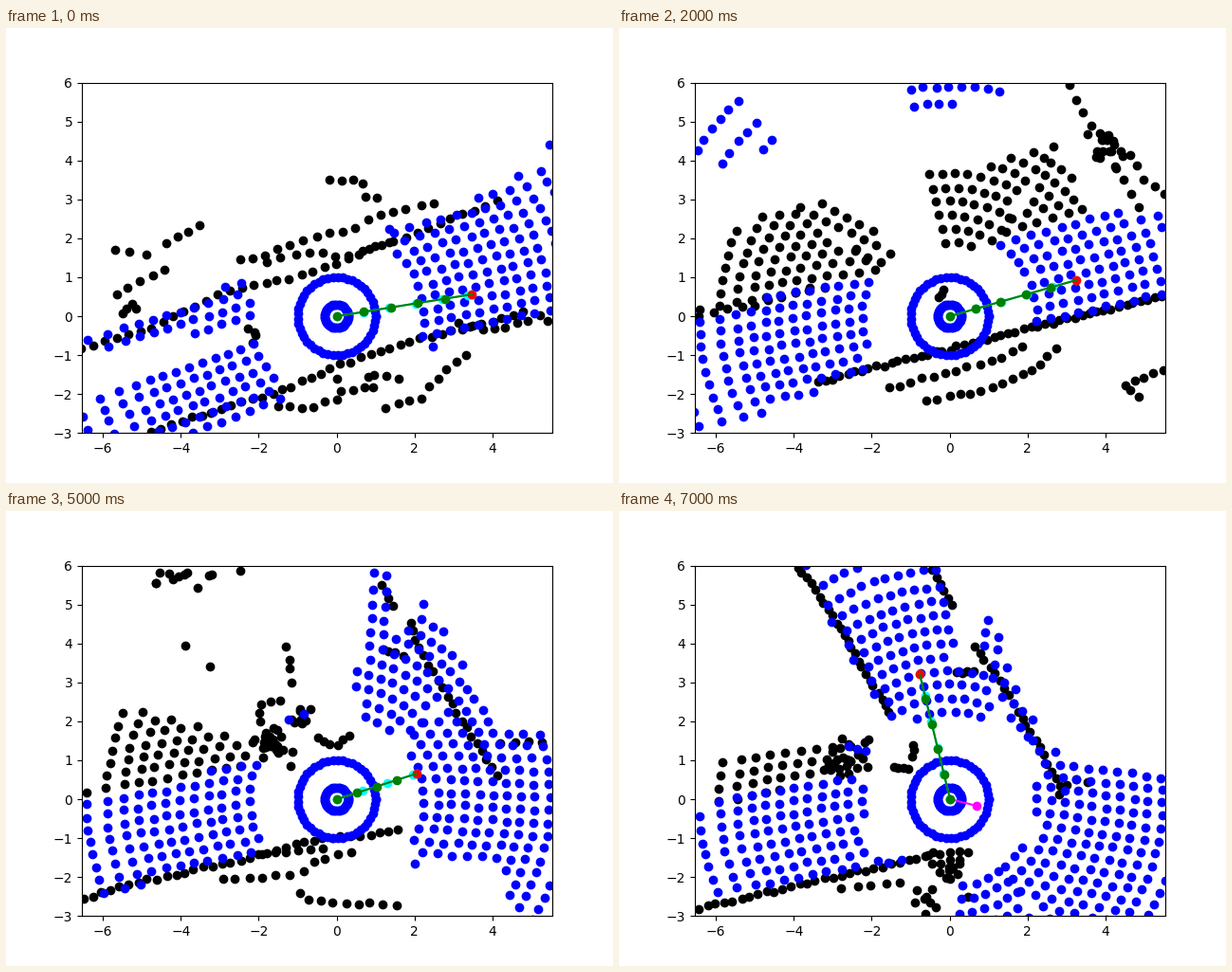
A matplotlib script for the animation above (8000 ms loop, 640 by 480 pixels).

```python
import numpy as np
import matplotlib.pyplot as plt
from matplotlib.animation import FuncAnimation
from matplotlib.path import Path

SCALE = 41.07                       # pixels per metre
ORIGIN = np.array([348.5, 304.0])   # robot position in stage pixels
PITCH = 13.5                        # dot spacing along a scan ring


def pairs(xy):
    return np.array(xy, float).reshape(-1, 2)


def to_data(points):
    p = (pairs(points) - ORIGIN) / SCALE
    return p[:, 0], -p[:, 1]


def ring_radii(first, last=370):
    """Scan rings: even near the robot, spreading with r squared further out."""
    r = first
    while r < last:
        yield r
        r += max(14.6, 0.00036 * r * r)


def ring_dots(first, axis):
    """Evenly spaced dots on every ring, counted from four perpendicular axes."""
    for r in ring_radii(first):
        n = int(r * np.pi / 4 / PITCH)
        turn = np.arange(-n, n + 1) * PITCH / r
        for quarter in range(4):
            a = np.radians(axis + 90 * quarter) + turn
            yield ORIGIN + r * np.c_[np.cos(a), -np.sin(a)]


class Cloud:
    """Scan dots: rings cut to regions, walls and clutter, in stage pixels."""

    def __init__(self, seed, first, offset=(0, 0)):
        self.rng = np.random.default_rng(seed)
        self.first = first
        self.offset = offset
        self.parts = []

    def region(self, axis, *xy):
        dots = np.vstack(list(ring_dots(self.first, axis)))
        inside = Path(pairs(xy) + self.offset).contains_points(dots)
        dots = dots[inside]
        self.parts.append(dots + self.rng.uniform(-1, 1, dots.shape))

    def wall(self, gap, *xy):
        p = pairs(xy) + self.offset
        s = np.r_[0, np.cumsum(np.hypot(*np.diff(p, axis=0).T))]
        at = np.linspace(0, s[-1], round(s[-1] / gap) + 1)
        dots = np.c_[np.interp(at, s, p[:, 0]), np.interp(at, s, p[:, 1])]
        self.parts.append(dots + self.rng.uniform(-1.5, 1.5, dots.shape))

    def clutter(self, n, x, y, sx, sy):
        dots = self.rng.normal((x, y), (sx, sy), (n, 2))
        self.parts.append(dots + self.offset)

    def data(self):
        return to_data(np.vstack(self.parts))


def bend(dark, blue):
    dark.wall(11, 153, 425, 224, 403, 290, 382, 350, 356, 420, 332, 470, 320, 545, 300)
    dark.wall(13, 78, 337, 150, 319, 230, 278, 310, 262, 370, 240, 440, 212, 518, 183)
    dark.wall(14, 246, 244, 269, 241, 311, 223, 364, 212, 390, 198, 450, 185)
    dark.wall(14, 276, 246, 325, 235, 355, 242, 404, 226)
    dark.wall(12, 340, 160, 374, 161, 381, 179, 391, 178)
    dark.wall(14, 115, 234, 147, 239)
    dark.wall(13, 170, 226, 205, 209)
    dark.wall(15, 118, 282, 142, 265, 166, 254)
    dark.wall(8, 122, 302, 135, 290, 138, 297)
    dark.wall(6, 256, 318, 264, 322, 260, 331)
    dark.wall(12, 288, 399, 314, 401, 348, 393)
    dark.wall(13, 401, 400, 438, 390, 451, 373, 485, 345)
    dark.wall(13, 350, 369, 352, 382, 390, 380, 379, 364, 415, 370)
    dark.wall(13, 477, 311, 508, 320, 537, 313, 564, 302, 572, 310)
    blue.region(17, 75, 325, 105, 322, 258, 262, 264, 310, 205, 322, 75, 340)
    blue.region(19, 75, 385, 262, 328, 298, 390, 190, 430, 78, 432)
    blue.region(12, 403, 210, 470, 188, 530, 165, 582, 115, 582, 300, 510, 315, 436, 342)


def junction(dark, blue):
    blue.region(10, 76, 178, 130, 161, 200, 143, 283, 125, 340, 112, 378, 102,
                410, 92, 445, 85, 512, 65, 512, 50, 72, 50)
    blue.region(10, 72, 440, 72, 195, 108, 200, 122, 218, 122, 300, 150, 290,
                262, 274, 262, 372, 345, 395, 352, 432)
    blue.region(10, 418, 238, 575, 198, 580, 297, 432, 335)
    dark.region(10, 180, 238, 190, 205, 240, 185, 300, 172, 380, 155, 467, 130, 495, 128,
                523, 118, 568, 105, 580, 185, 500, 222, 420, 245, 350, 245, 335, 236,
                300, 258, 265, 280, 168, 292)
    dark.wall(15, 139, 233, 158, 215, 171, 222)
    dark.wall(9, 500, 243, 508, 258, 527, 253)
    dark.clutter(28, 388, 372, 8, 18)
    dark.wall(11, 395, 342, 450, 327, 490, 318, 573, 297)
    dark.wall(16, 398, 362, 453, 350)
    blue.wall(14, 365, 407, 376, 395, 398, 393)


def corridor(dark, blue):
    blue.region(13, 74, 135, 112, 145, 150, 136, 167, 114, 126, 70, 100, 90)
    blue.region(13, 305, 55, 412, 55, 412, 72, 360, 70, 360, 86, 308, 88)
    blue.region(10, 78, 307, 150, 285, 272, 258, 262, 362, 150, 408, 78, 430)
    blue.region(13, 395, 228, 440, 215, 568, 185, 577, 210, 577, 290, 435, 322)
    dark.region(10, 80, 306, 110, 208, 150, 196, 200, 182, 245, 188, 300, 250, 262, 264, 150, 290)
    dark.region(13, 326, 155, 365, 150, 455, 120, 500, 195, 440, 212, 335, 240)
    dark.wall(16, 474, 60, 498, 103, 510, 115, 522, 145, 548, 190)
    dark.clutter(18, 515, 125, 8, 10)
    dark.wall(13, 540, 133, 551, 157, 575, 175)
    dark.wall(8, 210, 374, 280, 355, 330, 343, 440, 315, 573, 283)
    dark.wall(12, 283, 380, 350, 362, 405, 348, 425, 335)
    dark.wall(12, 325, 394, 385, 382, 440, 360, 460, 338)
    dark.wall(14, 85, 303, 150, 290, 200, 275)
    dark.wall(11, 547, 389, 533, 377, 573, 362)
    dark.wall(5, 336, 284, 343, 276)


def crossing(dark, blue):
    blue.region(10, 72, 133, 105, 150, 142, 144, 182, 134, 222, 123, 240, 108, 205, 70,
                200, 55, 135, 55, 72, 125)
    blue.region(10, 80, 305, 122, 295, 275, 260, 275, 365, 128, 402, 85, 412)
    blue.region(6, 428, 215, 450, 180, 490, 130, 518, 92, 577, 215, 577, 348, 520, 342,
                500, 325, 437, 325)
    blue.clutter(6, 380, 204, 5, 10)
    blue.wall(8, 402, 237, 418, 240)
    dark.region(10, 85, 300, 110, 210, 190, 193, 275, 170, 312, 245, 165, 270)
    dark.wall(19, 227, 90, 240, 111, 259, 146)
    dark.wall(9, 252, 60, 263, 76)
    dark.wall(13, 312, 181, 339, 176, 362, 184)
    dark.wall(11, 290, 205, 320, 222, 345, 240)
    dark.clutter(30, 362, 212, 17, 10)
    dark.wall(14, 372, 238, 410, 237)
    dark.clutter(20, 103, 332, 11, 13)
    dark.wall(10, 88, 406, 170, 386, 280, 360, 340, 345, 458, 322)
    dark.wall(14, 226, 388, 281, 388, 279, 401, 348, 398, 355, 404, 391, 398, 424, 387)
    dark.wall(13, 285, 365, 320, 370, 360, 366, 425, 340)
    dark.wall(16, 427, 398, 460, 403)
    dark.wall(9, 491, 135, 505, 160, 530, 200, 545, 220, 570, 262)


def opening(dark, blue):
    dark.region(10, 80, 302, 110, 210, 150, 205, 200, 222, 265, 240, 262, 268, 160, 290)
    dark.clutter(12, 190, 68, 22, 6)
    dark.wall(29, 190, 142, 214, 165)
    dark.wall(13, 296, 143, 300, 180)
    dark.wall(11, 269, 222, 268, 203, 288, 201)
    dark.clutter(22, 280, 246, 11, 11)
    dark.clutter(10, 310, 218, 6, 6)
    dark.wall(8, 330, 238, 338, 247, 349, 247, 361, 236)
    dark.wall(10, 82, 409, 130, 394, 260, 365, 320, 348, 413, 337)
    dark.wall(14, 228, 389, 290, 385, 310, 382, 325, 370, 365, 360)
    dark.wall(13, 270, 362, 335, 356)
    dark.wall(13, 310, 402, 313, 410, 349, 412, 411, 416)
    dark.wall(7, 398, 145, 418, 152)
    dark.wall(7, 396, 79, 409, 99)
    dark.wall(10, 428, 117, 431, 138, 445, 160, 475, 212, 517, 278)
    dark.wall(15, 521, 245, 565, 244)
    blue.region(10, 80, 305, 265, 262, 268, 362, 120, 402, 80, 412)
    blue.region(-3, 366, 182, 378, 105, 385, 60, 415, 62, 405, 140, 428, 115, 440, 95,
                478, 152, 515, 220, 577, 240, 577, 432, 538, 432, 520, 375, 428, 372,
                423, 240, 375, 216)
    blue.wall(16, 297, 219, 313, 215)


def turn(dark, blue):
    dark.region(10, 85, 320, 95, 262, 128, 258, 265, 240, 262, 258, 210, 285)
    dark.wall(8, 187, 60, 200, 72, 240, 135, 260, 172, 285, 212)
    dark.wall(9, 375, 142, 400, 178, 440, 245, 465, 290)
    dark.wall(9, 330, 63, 341, 83, 350, 100)
    dark.wall(6, 356, 170, 374, 169)
    dark.wall(6, 310, 247, 310, 259)
    dark.wall(6, 289, 271, 305, 271)
    dark.clutter(20, 240, 264, 11, 8)
    dark.wall(9, 84, 419, 190, 394, 300, 370, 330, 361, 367, 360)
    dark.clutter(13, 345, 373, 12, 7)
    dark.wall(14, 235, 397, 296, 393)
    dark.clutter(10, 325, 410, 25, 12)
    dark.wall(12, 465, 298, 478, 283, 495, 287)
    blue.region(10, 80, 320, 100, 305, 258, 280, 262, 380, 128, 402, 80, 412)
    blue.region(13, 187, 55, 345, 55, 355, 160, 395, 165, 400, 218, 285, 220, 262, 190)
    blue.region(-8, 376, 106, 386, 104, 412, 155, 440, 230, 470, 260, 577, 272, 577, 432,
                352, 432, 360, 392, 405, 370, 440, 340, 436, 250, 400, 205, 380, 150)
    blue.wall(10, 241, 247, 260, 252)
    blue.wall(13, 272, 370, 297, 369)


HOME = 349, 304
TREE = (
    (80, 313, 88, 320, 107, 342, 132, 328, 153, 307),
    (132, 328, 153, 347, 172, 367),
    (153, 347, 148, 383, 172, 367, 200, 360, 212, 386, 239, 396, 268, 399,
     291, 383, 319, 376, 322, 347, 347, 333, *HOME),
    (268, 399, 268, 440), (319, 376, 336, 397), (291, 383, 265, 378),
    (239, 396, 242, 368, 252, 342, 237, 319),
    (*HOME, 321, 295, 299, 314), (*HOME, 332, 280), (*HOME, 353, 332),
    (*HOME, 366, 282), (*HOME, 375, 295, 397, 278), (460, 285, 452, 253),
)
BACKTRACK = ((266, 306, 293, 297, 321, 296, *HOME),)
STUB = ((*HOME, 377, 311),)

# build, dark offset, goal, (bulge, sway) of the path, tree branches
STEPS = [
    (bend, (0, 0), (491, 281), (0, 0), ()),
    (junction, (0, 0), (540, 265), (5, 7), TREE),
    (corridor, (0, 0), (482, 266), (0, 0), ()),
    (crossing, (40, 4), (468, 279), (0, 0), ()),
    (crossing, (0, 0), (453, 293), (-3, -3), BACKTRACK),
    (opening, (0, 0), (433, 277), (0, 0), ()),
    (turn, (25, -25), (390, 200), (0, 0), ()),
    (turn, (0, 0), (317, 172), (0, 0), STUB),
]


def along(goal, shape, t):
    """Points from home to goal with a mid bulge and an S-shaped sway."""
    bulge, sway = shape
    p = np.array(HOME) + t[:, None] * np.subtract(goal, HOME)
    p[:, 1] += bulge * np.sin(np.pi * t) - sway * np.sin(2 * np.pi * t)
    return to_data(p)


fig, ax = plt.subplots(figsize=(6.4, 4.8), dpi=100)
ax.set_xlim(-6.5385, 5.5385)
ax.set_ylim(-3, 6)

dark_dots, = ax.plot([], [], "o", color="black")
blue_dots, = ax.plot([], [], "o", color="blue")
angle = np.linspace(0, 2 * np.pi, 50)
for radius in (1, 0.3):
    ax.plot(radius * np.cos(angle), radius * np.sin(angle), "o", color="blue")
tree, = ax.plot([], [], "-o", color="magenta")
guide, = ax.plot([], [], "-o", color="cyan")
target, = ax.plot([], [], "o", color="red")
drive, = ax.plot([], [], "-o", color="green", markevery=slice(0, -1))
artists = dark_dots, blue_dots, tree, guide, target, drive


def update(i):
    build, offset, goal, shape, branches = STEPS[i]
    dark = Cloud(2 * i + 1, 62.8, offset)
    blue = Cloud(2 * i + 2, 92)
    build(dark, blue)
    dark_dots.set_data(*dark.data())
    blue_dots.set_data(*blue.data())

    joined = [v for branch in branches for v in (*branch, np.nan, np.nan)]
    tree.set_data(*to_data(joined))
    length = np.hypot(*np.subtract(goal, HOME))
    guide.set_data(*along(goal, shape, np.r_[np.arange(0, length, 28) / length, 1]))
    legs = int(np.ceil(length / 28.9))
    drive.set_data(*along(goal, shape, np.linspace(0, 1, legs + 1)))
    target.set_data(*to_data(goal))
    return artists


anim = FuncAnimation(fig, update, frames=len(STEPS), interval=1000,
                     repeat=True, repeat_delay=0)
plt.show()
```
